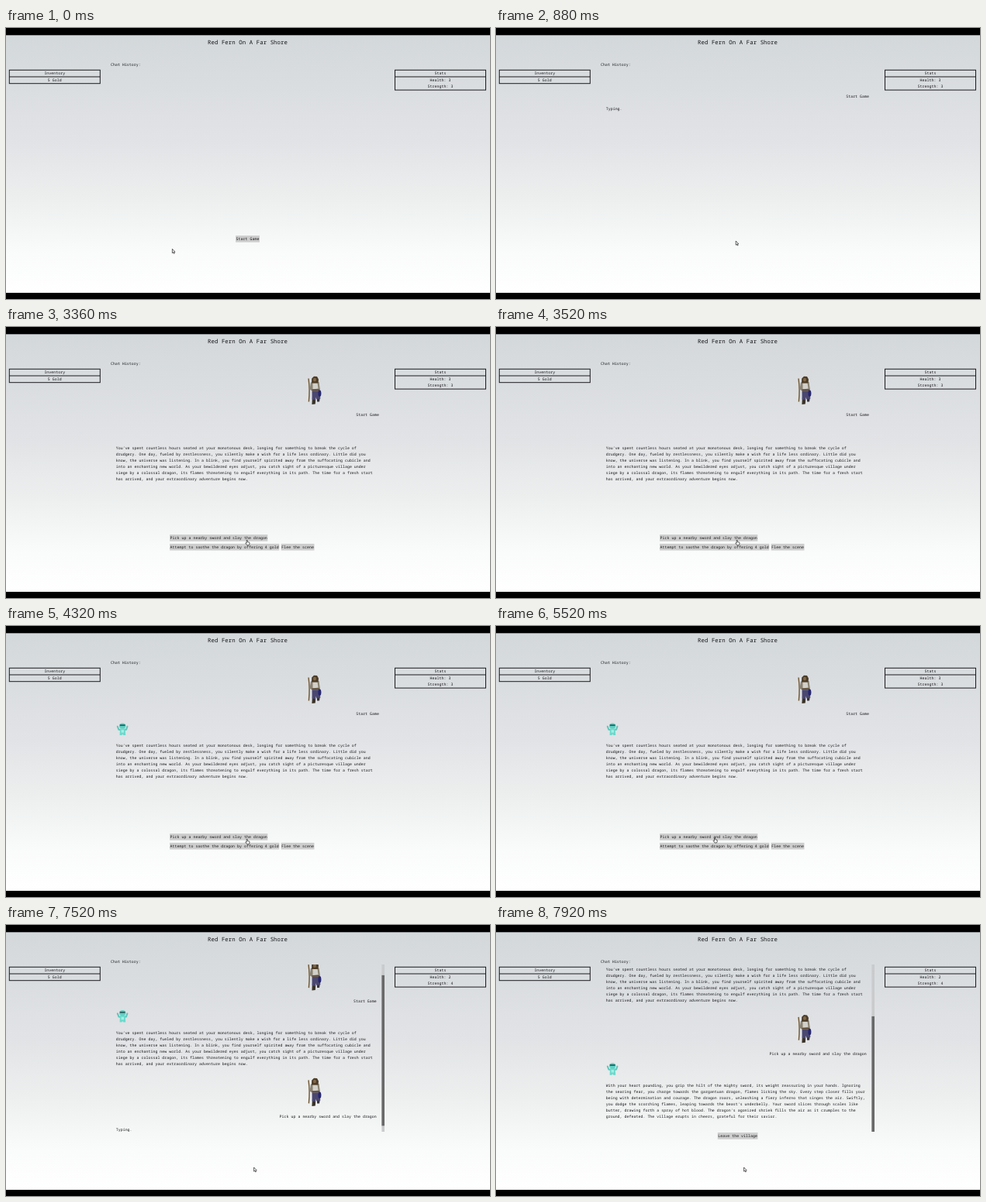
Animation of 624 by 350 pixels, one loop 8 s. Source, as an HTML page with a canvas:

```html
<!DOCTYPE html>
<html lang="en">
<head>
<meta charset="utf-8">
<title>Red Fern On A Far Shore</title>
<style>
html, body { margin: 0; width: 100%; height: 100%; overflow: hidden; background: #000; }
canvas { display: block; width: 624px; height: 350px; }
</style>
</head>
<body>
<canvas id="stage" width="624" height="350"></canvas>
<script>
const ctx = document.getElementById('stage').getContext('2d');
const LOOP = 8000, INK = '#141416', SMALL = 4.97, CHAR = 2.982, LINE = 8.07;
const VIEW = { top: 51, bottom: 267 };

// Moments of the session, in ms
const START = 880, HERO = 1120, STORY = 3360, MASCOT = 3760;
const FIGHT = 5840, PARK = 7520, REPLY = 7760, MASCOT2 = 7840;

const story = [
  "You've spent countless hours seated at your monotonous desk, longing for something to break the cycle of",
  "drudgery. One day, fueled by restlessness, you silently make a wish for a life less ordinary. Little did you",
  "know, the universe was listening. In a blink, you find yourself spirited away from the suffocating cubicle and",
  "into an enchanting new world. As your bewildered eyes adjust, you catch sight of a picturesque village under",
  "siege by a colossal dragon, its flames threatening to engulf everything in its path. The time for a fresh start",
  "has arrived, and your extraordinary adventure begins now."
];
const reply = [
  "With your heart pounding, you grip the hilt of the mighty sword, its weight reassuring in your hands. Ignoring",
  "the searing fear, you charge towards the gargantuan dragon, flames licking the sky. Every step closer fills your",
  "being with determination and courage. The dragon roars, unleashing a fiery inferno that singes the air. Swiftly,",
  "you dodge the scorching flames, leaping towards the beast's underbelly. Your sword slices through scales like",
  "butter, drawing forth a spray of hot blood. The dragon's agonized shriek fills the air as it crumples to the",
  "ground, defeated. The village erupts in cheers, grateful for their savior."
];

// Text is set large and scaled down so that small sizes keep exact spacing
function text(str, x, y, align = 'left', size = SMALL) {
  ctx.save();
  ctx.translate(x, y + size * 0.357);
  ctx.scale(0.02, 0.02);
  ctx.font = `${size * 50}px "Noto Sans Mono", "DejaVu Sans Mono", monospace`;
  ctx.textRendering = 'geometricPrecision';
  ctx.textAlign = align;
  ctx.fillStyle = INK;
  ctx.fillText(str, 0, 0);
  ctx.restore();
}

function lines(list, y) {
  list.forEach((str, i) => text(str, 141.7, y + i * LINE));
}

function rect(color, x, y, w, h) {
  ctx.fillStyle = color;
  ctx.fillRect(x, y, w, h);
}

function poly(color, ...pts) {
  ctx.fillStyle = color;
  ctx.beginPath();
  for (let i = 0; i < pts.length; i += 2) ctx.lineTo(pts[i], pts[i + 1]);
  ctx.closePath();
  ctx.fill();
}

function oval(color, x, y, rx, ry) {
  ctx.fillStyle = color;
  ctx.beginPath();
  ctx.ellipse(x, y, rx, ry, 0, 0, 7);
  ctx.fill();
}

function button(label, x, y) {
  rect('#cdcdcd', x - 0.5, y - 4.2, label.length * CHAR + 1, 8.6);
  text(label, x, y);
}

function table(x, title, rows) {
  const h = 9 + rows.length * 8.4;
  ctx.strokeStyle = '#1b1b1d';
  ctx.lineWidth = 1;
  ctx.strokeRect(x, 54.3, 117, h);
  ctx.beginPath();
  ctx.moveTo(x, 63);
  ctx.lineTo(x + 117, 63);
  ctx.stroke();
  const mid = x + 58.5;
  text(title, mid, 58.7, 'center');
  rows.forEach((row, i) => text(row, mid, 67.6 + i * 8, 'center'));
}

function hero(y) {
  ctx.save();
  ctx.translate(389, y);
  ctx.strokeStyle = '#6d542f';
  ctx.lineWidth = 1.4;
  ctx.beginPath();
  ctx.moveTo(1, 3);
  ctx.quadraticCurveTo(3, 17, 1.4, 33);
  ctx.stroke();
  poly('#3a3328', 6, 26, 10.5, 26, 9.8, 36, 5.4, 36.5);
  poly('#38343a', 12, 27, 16, 27, 15, 33, 12, 33);
  poly('#4a4770', 5.5, 18, 15, 18, 16.4, 29, 11.4, 30, 10.4, 27, 9.5, 31, 5.6, 30);
  poly('#8a8372', 4, 8, 14.5, 7.5, 16, 18, 13.5, 19, 5.5, 19, 2.5, 17);
  poly('#d2d0c9', 6.5, 9, 12.5, 9, 13.5, 16, 6.5, 17);
  rect('#5a4630', 5.5, 17, 9.5, 1.5);
  poly('#4c3c27', 5.2, 3, 8, 0.3, 12, 0.6, 14, 4, 13.5, 9, 5, 9);
  oval('#80684a', 9, 4.6, 2, 2.3);
  oval('#26266f', 15.4, 22.3, 2, 4.3);
  ctx.restore();
}

function mascot(y) {
  ctx.save();
  ctx.translate(142, y);
  ctx.strokeStyle = '#5cc7bc';
  ctx.lineWidth = 2;
  ctx.lineCap = ctx.lineJoin = 'round';
  ctx.beginPath();
  ctx.moveTo(1.8, 4.6);
  ctx.lineTo(3.4, 8.6);
  ctx.lineTo(6, 9);
  ctx.moveTo(14.4, 4.6);
  ctx.lineTo(13, 8.6);
  ctx.lineTo(10, 9);
  ctx.stroke();
  poly('#6bd9cc', 5, 7, 11.5, 7, 12.2, 15.8, 9, 15.8, 8.2, 14, 7.4, 15.8, 4.6, 15.8);
  oval('#62cfc3', 8.2, 3.8, 4.2, 3.6);
  rect('#285f5e', 4.8, 2.1, 6.8, 1.8);
  rect('#a3eee4', 6.5, 9, 3.5, 3.5);
  ctx.restore();
}

function backdrop() {
  rect('#000', 0, 0, 624, 350);
  const g = ctx.createLinearGradient(0, 9, 0, 342);
  g.addColorStop(0, '#d3d8db');
  g.addColorStop(0.42, '#e2e3e6');
  g.addColorStop(0.62, '#eceeee');
  g.addColorStop(0.85, '#fafbfb');
  g.addColorStop(1, '#ffffff');
  rect(g, 0, 9.3, 624, 332.7);
}

function typing(t, from, y) {
  const dots = Math.floor((t - from + 20) / 500) % 3 + 1;
  text('Typing' + '.'.repeat(dots), 141.7, y);
}

function chat(t) {
  const scroll = t >= REPLY ? 97 : t >= FIGHT ? 15.4 : 0;
  const right = t >= FIGHT ? 477.8 : 481;
  ctx.save();
  ctx.beginPath();
  ctx.rect(130, VIEW.top, 360, VIEW.bottom - VIEW.top);
  ctx.clip();
  ctx.translate(0, -scroll);
  if (t >= START) {
    const loaded = t >= HERO;
    if (loaded) hero(63.5);
    text('Start Game', right, loaded ? 113.6 : 88, 'right');
    if (t < STORY) typing(t, START, loaded ? 130 : 104.4);
  }
  if (t >= STORY) {
    if (t >= MASCOT) mascot(125.2);
    lines(story, t >= MASCOT ? 154.2 : 155.8);
  }
  if (t >= FIGHT) {
    hero(212.8);
    text('Pick up a nearby sword and slay the dragon', right, 262.8, 'right');
    if (t < REPLY) typing(t, FIGHT, 279.5);
  }
  if (t >= REPLY) {
    if (t >= MASCOT2) mascot(275);
    lines(reply, 303.8);
  }
  ctx.restore();
  if (t >= FIGHT) {
    const view = VIEW.bottom - VIEW.top, k = view / (t >= REPLY ? 313 : 240);
    rect('#c9cbcc', 484.4, VIEW.top, 3.6, view);
    rect('#696969', 484.4, VIEW.top + scroll * k, 3.6, view * k);
  }
}

function buttons(t) {
  if (t < START) button('Start Game', 296.6, 272.3);
  else if (t >= STORY && t < FIGHT) {
    button('Pick up a nearby sword and slay the dragon', 211.6, 272.3);
    button('Attempt to soothe the dragon by offering 4 gold', 211.6, 284.1);
    button('Flee the scene', 355.2, 284.1);
  } else if (t >= REPLY) button('Leave the village', 286.3, 272.3);
}

function glide(t, from, to) {
  const p = Math.min(1, Math.max(0, (t - from) / (to - from)));
  return p * p * (3 - 2 * p);
}

function pointer(t) {
  if (t >= PARK) return [319.6, 313];
  const a = glide(t, 40, 640), b = glide(t, 4840, 5520);
  return [214.4 + 94.8 * a - 28.7 * b, 285.4 - 10.4 * a - 1.8 * b];
}

function cursor(t) {
  const [x, y] = pointer(t);
  const hand = (t < START && x > 296 && y < 277) || (t >= STORY && t < FIGHT);
  ctx.save();
  ctx.translate(x, y);
  ctx.beginPath();
  const shape = hand
    ? [1, 0.4, 2, 0.4, 2.2, 2.6, 4.6, 3.2, 4.8, 5, 4, 6.8, 1.6, 6.8, -0.3, 4.4, 0, 3.7, 1, 4.2]
    : [0, 0, 0, 5.2, 1.2, 4.2, 2, 6, 2.9, 5.6, 2.1, 3.9, 3.6, 3.8];
  for (let i = 0; i < shape.length; i += 2) ctx.lineTo(shape[i], shape[i + 1]);
  ctx.closePath();
  ctx.fillStyle = '#fff';
  ctx.strokeStyle = '#222';
  ctx.lineWidth = 0.7;
  ctx.fill();
  ctx.stroke();
  ctx.restore();
}

function draw() {
  const t = performance.now() % LOOP;
  const fought = t >= FIGHT;
  backdrop();
  text('Red Fern On A Far Shore', 311.5, 18.6, 'center', 7.47);
  text('Chat History:', 135, 47.2);
  table(4.3, 'Inventory', ['5 Gold']);
  table(501.5, 'Stats', ['Health: ' + (fought ? 2 : 3), 'Strength: ' + (fought ? 4 : 3)]);
  chat(t);
  buttons(t);
  cursor(t);
  requestAnimationFrame(draw);
}
draw();
</script>
</body>
</html>
```
